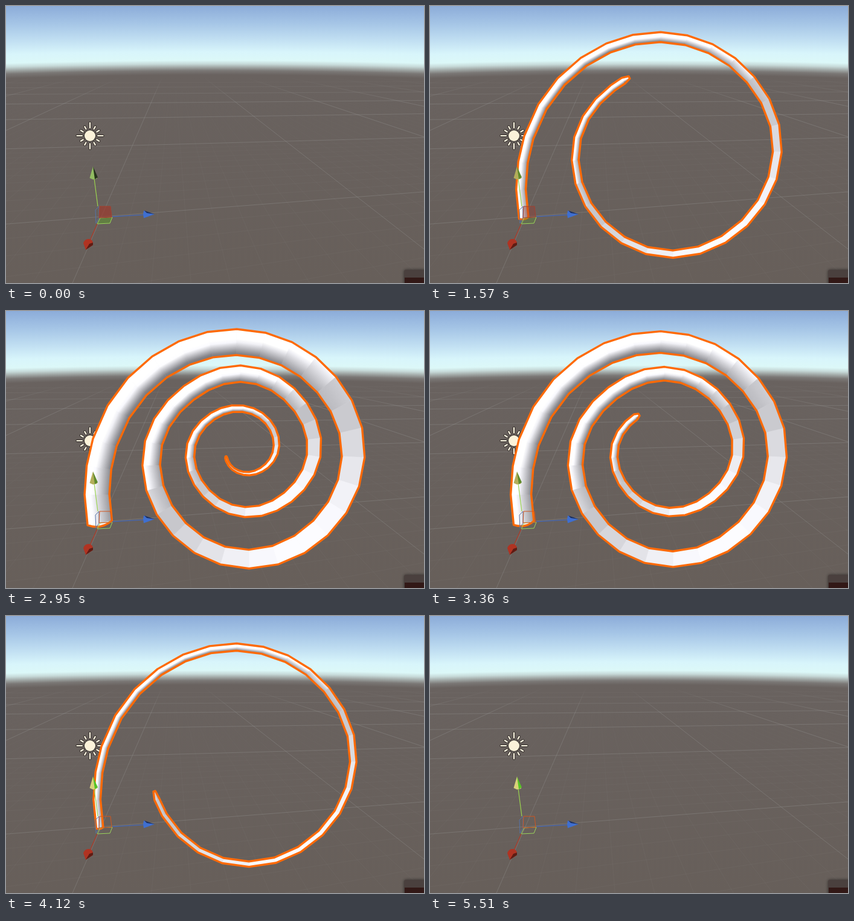
Animation, 692 px wide and 459 px high, one loop 5540 ms. Source, as an HTML page with a canvas:

```html
<!DOCTYPE html>
<html>
<head>
<meta charset="utf-8">
<style>
html, body { margin: 0; width: 100%; height: 100%; overflow: hidden; background: #69625e; }
canvas { display: block; }
</style>
</head>
<body>
<canvas id="stage" width="692" height="459"></canvas>
<script>
const W = 692, H = 459, LOOP = 5540;
const ctx = document.getElementById('stage').getContext('2d');
const RAD = Math.PI / 180;

// Smooth curve through [x, y] points
function curve(pts, x) {
  const n = pts.length - 1;
  if (x <= pts[0][0]) return pts[0][1];
  if (x >= pts[n][0]) return pts[n][1];
  let i = 0;
  while (x > pts[i + 1][0]) i++;
  const slope = k => {
    const a = pts[Math.max(0, k - 1)], b = pts[Math.min(n, k + 1)];
    return (b[1] - a[1]) / (b[0] - a[0]);
  };
  const [x0, y0] = pts[i], [x1, y1] = pts[i + 1];
  const d = x1 - x0, t = (x - x0) / d, u = 1 - t;
  return u * u * (1 + 2 * t) * y0 + t * t * (3 - 2 * t) * y1
    + d * t * u * (u * slope(i) - t * slope(i + 1));
}

const every = (step, start, values) => values.map((v, i) => [start + i * step, v]);

// Spiral angles run clockwise from the left, in degrees
const START = -27, END = 1060;
const RADII = every(45, -45, [291, 233, 195, 178, 174.5, 182, 182, 181, 167, 151, 131,
  126, 119, 117.5, 108, 103, 94, 88, 76, 68, 61, 54, 45, 39, 34, 28]);
const WIDTHS = every(90, 0, [40, 42, 37, 30, 28, 26, 22, 15.5, 13, 9.5, 8, 4, 2]);
const TIP = [[30, START], [540, 62], [1110, 240], [1570, 420], [2180, 789], [2590, END],
  [2950, END], [3690, 536], [4580, 175], [5230, 22], [5510, START]];

function spiral(a) {
  const r = curve(RADII, a);
  return [393 - r * Math.cos(a * RAD), 230 - r * Math.sin(a * RAD)];
}

function trace(c, pts, close) {
  c.beginPath();
  pts.forEach(p => c.lineTo(p[0], p[1]));
  if (close) c.closePath();
}

function poly(c, pts, fill, stroke, width = 1) {
  trace(c, pts, !!fill || pts.length > 2);
  if (fill) { c.fillStyle = fill; c.fill(); }
  if (stroke) { c.strokeStyle = stroke; c.lineWidth = width; c.stroke(); }
}

function makeScene() {
  const cv = document.createElement('canvas');
  cv.width = W; cv.height = H;
  const c = cv.getContext('2d');

  // Sky and ground, with a slightly bowed horizon
  for (let x = 0; x < W; x += 4) {
    const bow = 6 * ((x - 346) / 346) ** 2;
    const g = c.createLinearGradient(0, 0, 0, H);
    [[0, '#8cacd9'], [28, '#a5c5e6'], [55, '#c1dff2'], [76, '#d8f5fb'], [90, '#dcf8f8'],
      [96, '#c6d9d8'], [102, '#9da3a1'], [107, '#7a7775'], [114, '#69625f']]
      .forEach(([y, col]) => g.addColorStop((y + bow * y / 112) / H, col));
    g.addColorStop(1, '#675f5a');
    c.fillStyle = g;
    c.fillRect(x, 0, 4, H);
  }

  // Perspective grid
  const line = (x0, y0, x1, y1, alpha) => {
    const g = c.createLinearGradient(0, 118, 0, 330);
    g.addColorStop(0, 'rgba(150,150,148,0)');
    g.addColorStop(alpha > 0.2 ? 0.2 : 0.9, `rgba(150,150,148,${alpha})`);
    poly(c, [[x0, y0], [x1, y1]], null, g);
  };
  c.save();
  c.beginPath();
  c.rect(0, 116, W, H);
  c.clip();
  for (let k = -60; k <= 60; k++)
    line(276, 78, 110 + 65.4 * k, 459, k % 10 ? 0.08 : 0.36);
  for (let k = -9; k <= 60; k++) {
    if (k > 10 && k % 10) continue;
    const n = k / 10;
    const a = 0.00353 + 0.00277 * n, b = 0.00435 + 0.0028 * n;
    if (a > 0) line(0, 78 + 1 / a, W, 78 + 1 / b, k % 10 ? 0.08 : 0.36);
  }
  c.restore();

  // Sun icon
  c.save();
  c.translate(139, 215);
  c.lineCap = 'round';
  for (const [col, extra] of [['rgba(45,40,36,.75)', 2.2], ['#fbf5e2', 0]]) {
    for (let i = 0; i < 12; i++) {
      const a = i * 30 * RAD, end = i % 3 ? 17.5 : 21.5;
      poly(c, [13, end].map(r => [r * Math.cos(a), r * Math.sin(a)]), null, col, 2.2 + extra);
    }
    c.beginPath();
    c.arc(0, 0, 9 + extra / 2, 0, 7);
    c.fillStyle = extra ? col : '#fbf2da';
    c.fill();
  }
  c.restore();

  // Corner panel
  c.save();
  c.shadowColor = 'rgba(0,0,0,.5)';
  c.shadowBlur = 5;
  c.fillStyle = '#4a403e';
  c.beginPath();
  c.roundRect(659, 437, 50, 40, 3);
  c.fill();
  c.restore();
  c.fillStyle = '#321816';
  c.fillRect(660, 450, 32, 9);
  return cv;
}

// Light from the upper left; v runs from the outer (1) to the inner (-1) edge
function shade(v, nx, ny) {
  const facing = -0.5 * nx - 0.85 * ny;
  const front = 192 + 62 * Math.abs(facing);
  const b = Math.max(116, Math.min(255, front + 165 * v * Math.max(0, facing)));
  return `rgb(${b},${b},${Math.min(255, b + 5)})`;
}

function drawTube(t) {
  const tip = curve(TIP, t);
  if (tip <= START + 0.2) return;
  const u = (tip - START) / (END - START), size = u * u * (3 - 2 * u);

  const angles = [];
  for (let i = 0; ; i++) {
    const a = i < 3 ? START + 10 * i : 3 + 13.9 * (i - 3);
    if (a >= tip - 6) break;
    angles.push(a);
  }
  angles.push(Math.max(START, tip - 5), tip);

  const ribs = angles.map(a => {
    const [x, y] = spiral(a), p = spiral(a - 1), q = spiral(a + 1);
    const dx = q[0] - p[0], dy = q[1] - p[1], len = Math.hypot(dx, dy);
    const nx = dy / len, ny = -dx / len;
    const half = (1 + curve(WIDTHS, a) * size) / 2 * (a === tip ? 0.4 : 1);
    return { x, y, nx, ny, half,
      out: [x + nx * half, y + ny * half], inn: [x - nx * half, y - ny * half] };
  });

  const base = ribs[0], bulge = 12 * size;
  const cap = [base.x + base.ny * bulge, base.y - base.nx * bulge];
  const outline = () => {
    trace(ctx, [...ribs.map(r => r.out), ...ribs.map(r => r.inn).reverse()]);
    ctx.quadraticCurveTo(...cap, ...base.out);
    ctx.closePath();
  };

  ctx.save();
  outline();
  ctx.fillStyle = '#f4f4f6';
  ctx.fill();
  for (let i = 0; i + 1 < ribs.length; i++) {
    const a = ribs[i], b = ribs[i + 1];
    const x = (a.x + b.x) / 2, y = (a.y + b.y) / 2, h = (a.half + b.half) / 2;
    const nx = (a.nx + b.nx) / 2, ny = (a.ny + b.ny) / 2;
    const g = ctx.createLinearGradient(x + nx * h, y + ny * h, x - nx * h, y - ny * h);
    for (let k = 0; k <= 8; k++) g.addColorStop(k / 8, shade(1 - k / 4, nx, ny));
    poly(ctx, [a.out, b.out, b.inn, a.inn], g, g, 0.7);
  }
  outline();
  ctx.lineJoin = 'round';
  ctx.strokeStyle = '#ff6a05';
  ctx.lineWidth = 3.4;
  ctx.stroke();
  ctx.restore();
}

function drawGizmo(t) {
  const solid = t < 30, filled = t < 1700;
  poly(ctx, [[148, 338], [154, 332], [154, 351], [149, 360]], null, '#5673a8');
  poly(ctx, [[151, 361], [172, 360], [176, 350], [156, 351]],
    filled && `rgba(95,140,55,${solid ? 0.7 : 0.35})`, '#9bd45c');
  poly(ctx, [[155, 332], [173, 332], [175, 350], [154, 351]],
    filled && `rgba(160,55,42,${solid ? 0.65 : 0.35})`, filled ? '#a5402f' : '#d2561f');

  poly(ctx, [[152, 332], [146, 286]], null, '#9bd44f', 1.2);
  poly(ctx, [[176, 349], [228, 346]], null, '#3c68c8', 1.2);
  poly(ctx, [[151, 361], [139, 388]], null, '#b03a28', 1.2);

  const [left, right] = solid ? ['#92bd62', '#26331c']
    : t < 4000 ? ['#b3ae5a', '#5f8a2c'] : ['#d9d27a', '#55c426'];
  poly(ctx, [[144, 266], [138.5, 285], [144, 287.5], [151, 286]], left);
  poly(ctx, [[144, 266], [147, 287], [152, 284]], right);

  poly(ctx, [[246, 345], [228, 339], [227, 345], [228, 351.5]], '#3f6fd0');
  poly(ctx, [[246, 345], [229, 339], [233, 343]], '#1c2f5e');

  ctx.fillStyle = '#b03322';
  ctx.beginPath();
  ctx.moveTo(132, 404);
  ctx.lineTo(128, 393);
  ctx.quadraticCurveTo(130, 386, 137, 386);
  ctx.quadraticCurveTo(145, 387, 144, 396);
  ctx.fill();
  poly(ctx, [[132, 404], [138, 394], [144, 392], [144, 396]], '#5e1c14');
}

const scene = makeScene();
const began = performance.now();

function frame() {
  const t = (performance.now() - began) % LOOP;
  ctx.drawImage(scene, 0, 0);
  drawTube(t);
  drawGizmo(t);
  requestAnimationFrame(frame);
}
frame();
</script>
</body>
</html>
```
